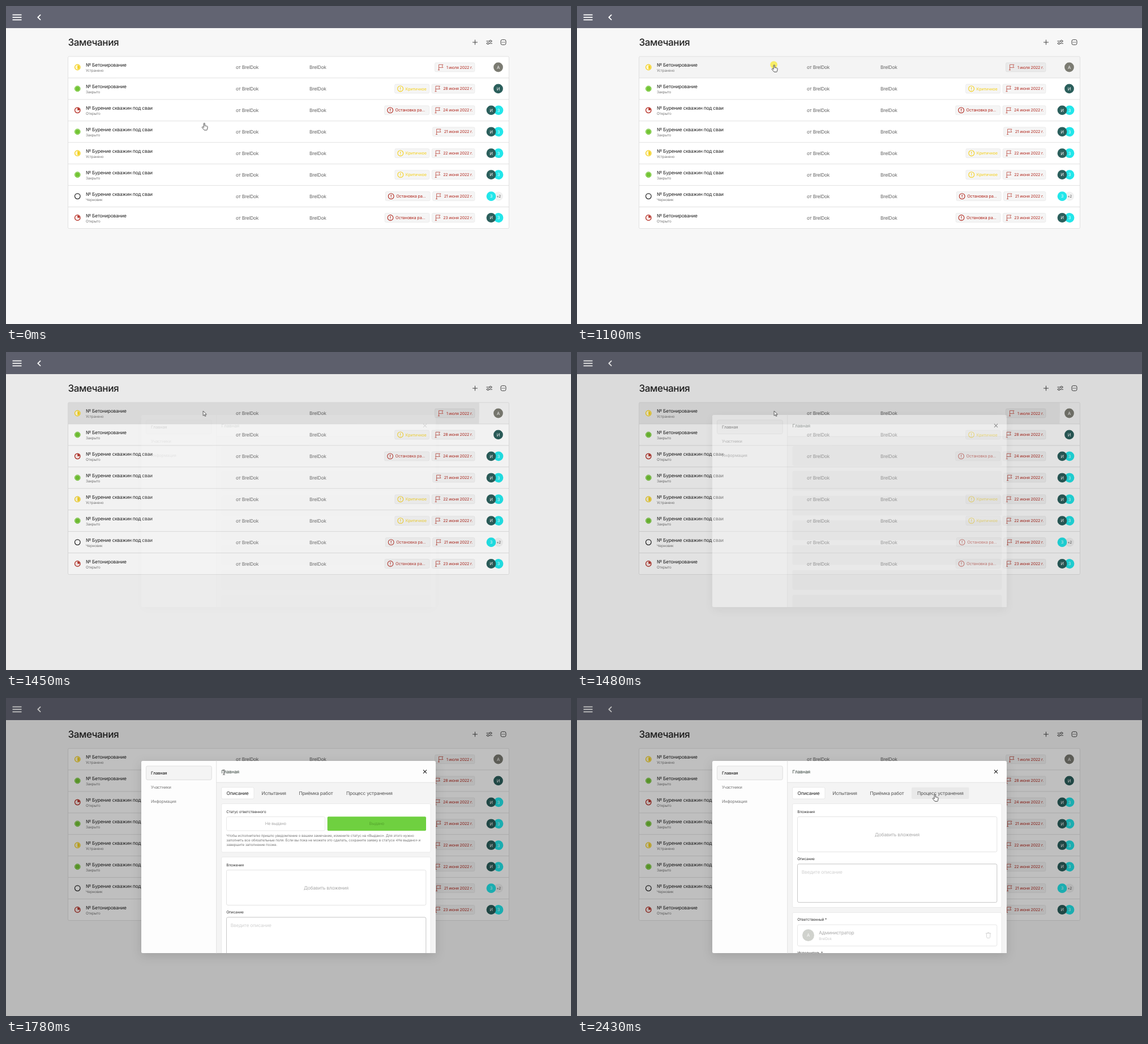
Write an HTML page that moves like this. It is 998 px wide and 561 px high and loops after 2.46 s.

```html
<!DOCTYPE html>
<html lang="ru">
<head>
<meta charset="utf-8">
<title>Замечания</title>
<style>
html, body { margin: 0; width: 100%; height: 100%; overflow: hidden; background: #f7f7f7; }
svg { display: block; width: 100%; height: 100%; }
text { font-family: Inter, Roboto, "Noto Sans", sans-serif; letter-spacing: -.025em; white-space: pre; text-rendering: geometricPrecision; }
.mid { text-anchor: middle; }
.end { text-anchor: end; }
.bold { font-weight: 500; }
.line { fill: none; stroke-linecap: round; stroke-linejoin: round; }
.chip { fill: rgba(0,0,0,.04); stroke: rgba(0,0,0,.075); }
.panel { filter: drop-shadow(0 5px 9px rgba(0,0,0,.13)); }

.anim { animation: 2460ms linear infinite both; }
.step { animation: 2460ms steps(1, end) infinite both; }

#cursor { animation-name: travel; }
@keyframes travel {
  0%, 1.2% { transform: translate(350.2px, 206.6px); animation-timing-function: cubic-bezier(.4, 0, .4, 1); }
  10.5%, 21.12% { transform: translate(348.2px, 103.2px); }
  21.13%, 67.3% { transform: translate(348.2px, 104px); animation-timing-function: ease-in; }
  72.35% { transform: translate(384.4px, 131px); }
  88.6% { transform: translate(529px, 164.6px); animation-timing-function: cubic-bezier(.3, .3, .4, 1); }
  98.75%, 100% { transform: translate(632.2px, 170px); }
}
#hand { animation-name: hand; }
@keyframes hand { 0% { opacity: 1 } 56.9% { opacity: 0 } 85.15%, 100% { opacity: 1 } }
#arrow { animation-name: arrow; }
@keyframes arrow { 0% { opacity: 0 } 56.9% { opacity: 1 } 71.9% { opacity: 0 } 75.45% { opacity: 1 } 85.15%, 100% { opacity: 0 } }
#beam { animation-name: beam; }
@keyframes beam { 0% { opacity: 0 } 71.9% { opacity: 1 } 75.45%, 100% { opacity: 0 } }

#hover3 { animation-name: hover3; }
@keyframes hover3 { 0% { opacity: 0 } 1.2% { opacity: 1 } 2.2%, 100% { opacity: 0 } }
#hover2 { animation-name: hover2; }
@keyframes hover2 { 0% { opacity: 0 } 2.2% { opacity: 1 } 4.9%, 100% { opacity: 0 } }
#hover1 { animation-name: hover1; }
@keyframes hover1 { 0% { opacity: 0 } 4.9% { opacity: 1 } 6.6%, 100% { opacity: 0 } }
#hover0 { animation-name: hover0; }
@keyframes hover0 { 0% { opacity: 0 } 6.6% { opacity: 1 } 60.9%, 100% { opacity: 0 } }

#click { animation-name: click; }
@keyframes click { 0%, 44.69% { opacity: 0 } 44.7%, 48.8% { opacity: .85 } 52.8%, 100% { opacity: 0 } }
#ripple { animation-name: ripple, rippleFade; }
@keyframes ripple {
  0%, 47.97% { transform: scale(0); animation-timing-function: cubic-bezier(0, 0, .2, 1); }
  66.26%, 100% { transform: scale(1); }
}
@keyframes rippleFade { 0%, 58.94% { opacity: .06 } 62.2% { opacity: .015 } 64%, 100% { opacity: 0 } }

#shade { animation-name: shade; }
@keyframes shade { 0%, 58.1% { opacity: 0 } 58.94% { opacity: .05 } 62.2% { opacity: .21 } 65.8%, 100% { opacity: .25 } }
#modal { animation-name: modal; }
@keyframes modal { 0%, 58.1% { opacity: 0 } 58.94% { opacity: .11 } 62.2% { opacity: .92 } 65%, 100% { opacity: 1 } }
#bones { animation-name: bones; }
@keyframes bones { 0% { opacity: 1 } 69.9%, 100% { opacity: 0 } }
#form { animation-name: form; }
@keyframes form { 0% { opacity: 0 } 69.9%, 100% { opacity: 1 } }
#status { animation-name: status; }
@keyframes status { 0% { opacity: 1 } 74.8%, 100% { opacity: 0 } }
#fields { animation-name: fields; }
@keyframes fields { 0% { transform: translateY(94px) } 74.8%, 100% { transform: none } }
#tab1 { animation-name: tab1; }
@keyframes tab1 { 0% { opacity: 0 } 85.15% { opacity: 1 } 86.2%, 100% { opacity: 0 } }
#tab2 { animation-name: tab2; }
@keyframes tab2 { 0% { opacity: 0 } 86.2% { opacity: 1 } 92.2%, 100% { opacity: 0 } }
#tab3 { animation-name: tab3; }
@keyframes tab3 { 0% { opacity: 0 } 92.2%, 100% { opacity: 1 } }
</style>
</head>
<body>
<svg id="stage" viewBox="0 0 998 561"></svg>
<script>
const FIRM = 'BrelDok';
const RED = '#b0271d', YELLOW = '#f3cf1c', GREEN = '#72c434', TEAL = '#2b5f5c', CYAN = '#22e6ea';

const text = (x, y, s, size, fill, cls = '') =>
  `<text x="${x}" y="${y}" font-size="${size}" fill="${fill}" class="${cls}">${s}</text>`;
const rect = (x, y, x2, y2, fill, rest = '') =>
  `<rect x="${x}" y="${y}" width="${x2 - x}" height="${y2 - y}" fill="${fill}" ${rest}/>`;
const box = (x, y, x2, y2, fill, stroke) => rect(x, y, x2, y2, fill, `rx="2.5" stroke="${stroke}" stroke-width=".8"`);
const line = (d, stroke, w = 1) => `<path class="line" d="${d}" stroke="${stroke}" stroke-width="${w}"/>`;
const disc = (x, y, r, fill, rest = '') => `<circle cx="${x}" cy="${y}" r="${r}" fill="${fill}" ${rest}/>`;
const ring = (x, y, r, stroke, w = 1.1, fill = 'none') => disc(x, y, r, fill, `stroke="${stroke}" stroke-width="${w}"`);

const states = {
  'Устранено': y => ring(126.3, y, 4.8, YELLOW, 1.2, '#fdf6cf') + `<path d="M126.3 ${y - 3.6}a3.6 3.6 0 0 1 0 7.2z" fill="${YELLOW}"/>`,
  'Закрыто': y => ring(126.3, y, 4.9, GREEN, 1, '#d5efbd') + disc(126.3, y, 3.9, GREEN),
  'Открыто': y => ring(126.3, y, 4.8, RED, 1.2, '#fbe9e7') + `<path d="M126.3 ${y}v-3.8a3.8 3.8 0 0 1 3.8 3.8z" fill="${RED}"/>`,
  'Черновик': y => ring(126.3, y, 4.8, '#222', 1.2)
};

const POUR = '№ Бетонирование', DRILL = '№ Бурение скважин под сваи';
const CRIT = 'Критичное', STOP = 'Остановка ра...';
// title, state, priority, date, date chip left, people
const rows = [
  [POUR, 'Устранено', '', '1 июля', 757.5, 'А'],
  [POUR, 'Закрыто', CRIT, '28 июня', 752, 'И'],
  [DRILL, 'Открыто', STOP, '24 июня', 752, 'ИЗ'],
  [DRILL, 'Закрыто', '', '21 июня', 753.6, 'ИЗ'],
  [DRILL, 'Устранено', CRIT, '22 июня', 752.2, 'ИЗ'],
  [DRILL, 'Закрыто', CRIT, '22 июня', 752.2, 'ИЗ'],
  [DRILL, 'Черновик', STOP, '21 июня', 753.6, 'З+'],
  [POUR, 'Открыто', STOP, '23 июня', 752.4, 'ИЗ']
];

const faces = { 'А': '#7b7b72', 'И': TEAL, 'З': CYAN };
function face(x, y, who) {
  if (who === '+') return disc(x, y, 8, '#f1f1f1') + text(x + .3, y + 2.3, '+2', 6.5, '#555', 'mid');
  return disc(x, y, 8.4, faces[who]) + text(x, y + 2.8, who, 7.6, '#fff', 'mid');
}

const chip = (x, x2, y) => `<rect class="chip" x="${x}" y="${y - 8}" width="${x2 - x}" height="16" rx="2.2" stroke-width=".8"/>`;

function priority(name, right, y) {
  const x = right - (name === CRIT ? 61 : 79), c = name === CRIT ? YELLOW : RED;
  return chip(x, right, y) + ring(x + 10, y, 4.9, c, 1.1) +
    line(`M${x + 10} ${y - 2.5}v2.8m0 2v.2`, c, 1.1) + text(x + 19, y + 2.6, name, 7.3, c);
}

function row([title, state, prio, date, left, people], i) {
  const y = 108 + 37.93 * i, top = y - 19;
  const hover = i < 4 ? rect(110, top, 888, top + 37.9, '#f4f4f4', `id="hover${i}" class="step"`) : '';
  const ripple = i ? '' : '<g clip-path="url(#first)"><g transform="translate(348 104)"><circle id="ripple" class="anim" r="540"/></g></g>';
  const who = people.length > 1 ? face(870, y, people[1]) + face(857, y, people[0]) : face(869.5, y, people);
  return hover + ripple +
    (i ? line(`M110 ${top}H888`, '#dedede', .9) : '') +
    states[state](y) +
    text(141, y - .9, title, 8.4, '#222') + text(141, y + 8.3, state, 6.4, '#777') +
    text(406, y + 3, 'от ' + FIRM, 8.4, '#666') + text(536, y + 3, FIRM, 8.4, '#666') +
    (prio ? priority(prio, left - 4.4, y) : '') + chip(left, 828, y) +
    line(`M${left + 7} ${y + 4.8}V${y - 4.6}h7.4l-1.6 2.6 1.6 2.6h-7.4m-1.2 4.2h2.4`, '#c0594e', .9) +
    text(824.3, y + 2.5, date + ' 2022 г.', 7.05, RED, 'end') + who;
}

const page = rect(0, 0, 998, 561, '#f7f7f7') + rect(0, 0, 998, 39, '#626472') +
  [15.6, 20, 24.4].map(y => rect(11.5, y - .9, 27.5, y + .9, '#fff')).join('') +
  line('M60.6 15.8L56.3 20l4.3 4.2', '#fff', 1.8) +
  text(109.5, 70.2, 'Замечания', 17.1, '#222', 'bold') +
  line('M828.5 60v8M824.5 64h8', '#444') +
  line('M848.8 62h5M857.8 62h.8M848.8 66h.6M853.4 66h5.2', '#444') + ring(855.8, 62, 1.7, '#444', 1) + ring(851.4, 66, 1.7, '#444', 1) +
  `<rect x="874" y="59.4" width="9" height="9" rx="2.6" fill="none" stroke="#444"/>` +
  [876.3, 878.5, 880.7].map(x => disc(x, 64, .7, '#444')).join('') +
  rect(109.5, 89, 888.5, 392.5, '#fff', 'rx="2"') + rows.map(row).join('') +
  '<rect x="109.5" y="89" width="779" height="303.5" rx="2" fill="none" stroke="#dedede" stroke-width=".9"/>';

const side = box(247.5, 120, 363.2, 144.4, '#f4f4f4', '#d9d9d9') +
  text(256, 134.6, 'Главная', 7.35, '#222', 'bold') +
  text(256, 159.5, 'Участники', 7.35, '#7a7a7a') + text(256, 184.5, 'Информация', 7.35, '#7a7a7a');

const bones = Array.from({ length: 7 }, (_, i) => {
  const y = 166 + 43.7 * i;
  return rect(380.5, y, 750.5, y + 35, '#e8e8e8', 'rx="3"');
}).join('');

const tabHover = (n, x, x2) => rect(x, 157.5, x2, 178, '#e9e9e9', `rx="2" id="tab${n}" class="step"`);
const tabs = box(380.5, 157.5, 438, 178, '#fff', '#e4e4e4') +
  tabHover(1, 442, 503.5) + tabHover(2, 508, 587) + tabHover(3, 591, 692.5) +
  [[409, 'Описание', '#222'], [473, 'Испытания', '#555'], [547.5, 'Приёмка работ', '#555'], [641.8, 'Процесс устранения', '#555']]
    .map(([x, s, c]) => text(x, 171, s, 8.35, c, 'mid')).join('');

const card = (y, y2) => box(380.5, y, 750, y2, '#fff', '#e6e6e6');
const label = (y, s) => text(389.3, y, s, 6.5, '#333');

const note = [
  'Чтобы исполнителю пришло уведомление о вашем замечание, измените статус на «Выдано». Для этого нужно',
  'заполнить все обязательные поля. Если вы пока не можете это сделать, сохраните заявку в статусе «Не выдано» и',
  'завершите заполнение позже.'
].map((s, i) => text(389.3, 244.8 + 8.2 * i, s, 6.3, '#777')).join('');

const status = card(186.5, 272) + label(203.2, 'Статус ответственного') +
  box(389.5, 209.5, 563.5, 234, '#fff', '#e3e3e3') + text(476.3, 224.4, 'Не выдано', 7.35, '#aaa', 'mid') +
  rect(567.7, 209.2, 742, 234.2, '#6fd040', 'rx="2"') + text(654.8, 224.4, 'Выдано', 7.35, '#55a52e', 'mid') + note;

const bin = line('M722.3 415.2h8.6M723.2 415.2l.5 7.2q.1 1 1.1 1h3.6q1 0 1.1-1l.5-7.2M725 415l.5-1.4h2.2l.5 1.4', '#d2d2d2', .9);

const fields = card(186.5, 369.5) + label(203.1, 'Вложения') +
  box(389.5, 209.5, 741.8, 271.5, '#fff', '#dcdcdc') + text(565.5, 243.8, 'Добавить вложения', 8.35, '#aaa', 'mid') +
  label(286.1, 'Описание') + box(389.5, 292.8, 741.8, 360.6, '#fff', '#b8b8b8') +
  text(396.8, 309.6, 'Введите описание', 8.35, '#d2d2d2') +
  card(378.5, 480) + label(393.3, 'Ответственный *') + box(389.5, 400, 741.8, 437.5, '#fff', '#e0e0e0') +
  disc(408.5, 418.5, 10.5, '#d0d2cd') + text(408.5, 421.2, 'А', 7.6, '#fff', 'mid') +
  text(427.3, 417.4, 'Администратор', 8.4, '#aaa') + text(427.3, 426.8, FIRM, 6.4, '#ccc') + bin +
  label(452.4, 'Исполнитель *');

const modal = rect(239, 111, 759, 450, '#fdfdfd', 'rx="2.5" class="panel"') + side +
  rect(372, 149, 759, 450, '#f4f4f4') +
  line('M371.7 111V450M371.7 149H759', '#dfdfdf', .9) +
  text(380.5, 132.9, 'Главная', 8.25, '#33403a') +
  line('M737.3 127.2l5.4 5.4M742.7 127.2l-5.4 5.4', '#222', 1.1) +
  `<g clip-path="url(#body)"><g id="bones" class="step">${bones}</g>
   <g id="form" class="step">${tabs}<g id="fields" class="step">${fields}</g><g id="status" class="step">${status}</g></g></g>`;

const pointer = (id, d, fill, w) =>
  `<path id="${id}" class="step" d="${d}" fill="${fill}" stroke="#333" stroke-width="${w}" stroke-linejoin="round"/>`;
const cursor =
  pointer('hand', 'M-1 1a1 1 0 0 1 2 0v3.6l3.6.7q1.4.3 1.3 1.8l-.5 3q-.2 1.5-.9 2.2H0L-3.6 8.2q-.9-1.3.2-1.7.7-.3 1.5.5l.9.9z', '#fff', .9) +
  pointer('arrow', 'M0 0v8.4l2-1.8 1.4 3 1.3-.6-1.4-2.9h2.7z', '#fff', .8) +
  pointer('beam', 'M-1.8-4.3q1.8 0 1.8 1V3.3q0 1 1.8 1M1.8-4.3Q0-4.3 0-3.3M0 3.3q0 1-1.8 1', 'none', .9);

document.getElementById('stage').innerHTML =
  `<defs><clipPath id="first">${rect(110, 89.4, 888, 126.9, '#000')}</clipPath>
   <clipPath id="body">${rect(372, 149.5, 759, 450, '#000', 'rx="2"')}</clipPath></defs>
   ${page}
   ${rect(0, 0, 998, 561, '#000', 'id="shade" class="anim"')}
   <g id="modal" class="anim">${modal}</g>
   ${disc(347.6, 103.6, 6.4, '#f9ee4e', 'id="click" class="anim"')}
   <g id="cursor" class="anim">${cursor}</g>`;
</script>
</body>
</html>
```
